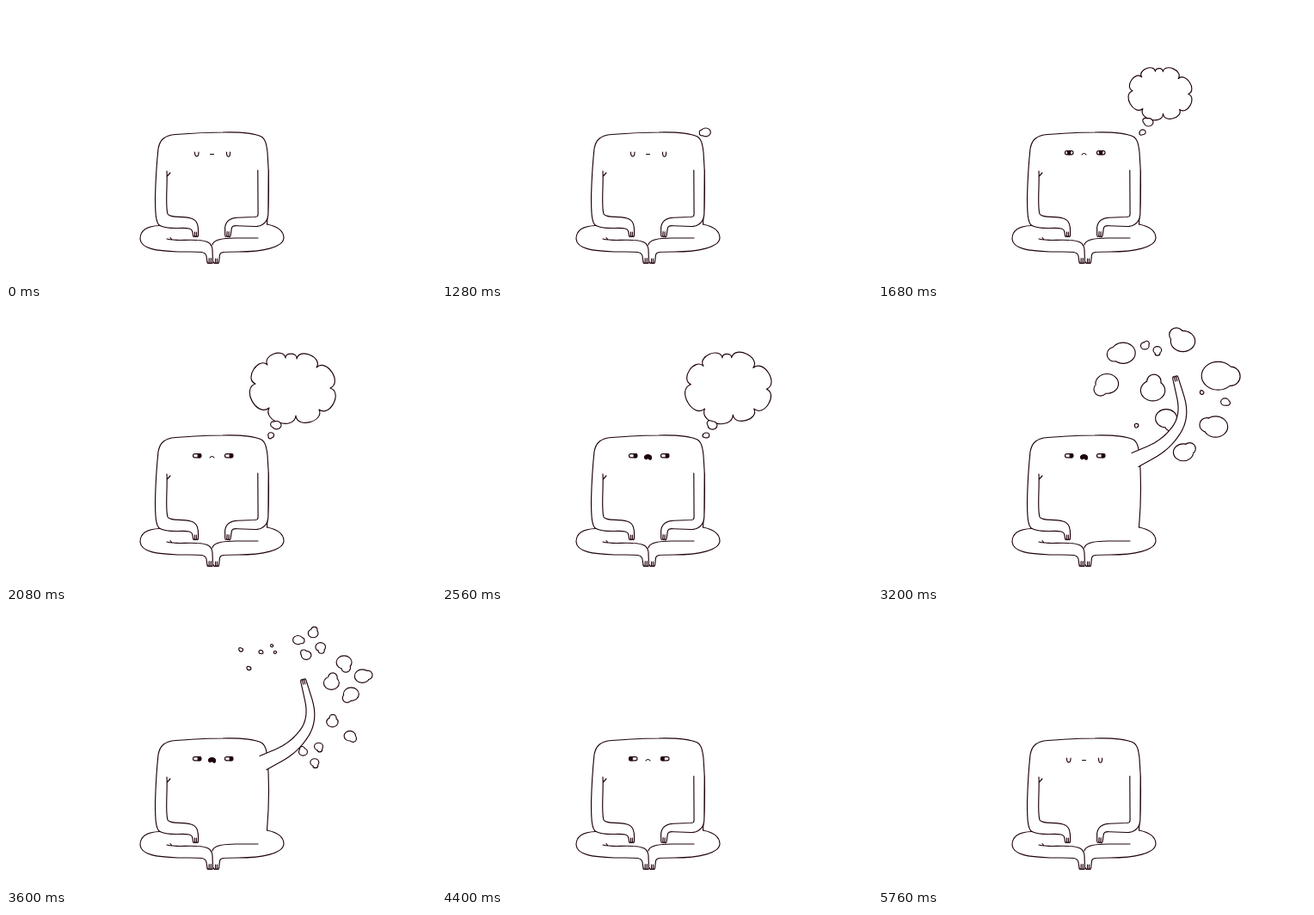
An HTML page for the animation above (6000 ms loop, 500x320 px).

```html
<!DOCTYPE html>
<html lang="en">
<head>
<meta charset="utf-8">
<title>Clearing the mind</title>
<style>
html, body { margin: 0; width: 100%; height: 100%; overflow: hidden; background: #fff; }
svg { display: block; width: 100vw; height: 100vh; }
path, rect { stroke: #1e0209; stroke-width: 1.15; fill: none; stroke-linecap: round; stroke-linejoin: round; }
.solid { fill: #1e0209; }
.paper { fill: #fff; }
#puffs { fill: #fff; stroke-width: 2.3; paint-order: stroke; }
#arm { fill: #fff; stroke: none; }
</style>
</head>
<body>
<svg viewBox="0 0 500 320">
  <path id="cloud" class="paper"/>
  <path id="puffs"/>

  <!-- body and left arm -->
  <path d="M179 255.500C174 253 173.500 240 173.500 222C174 203 175 185 177 166C179 155 185 150.500 197 149.500C217 148 235 147 252 147C272 146.500 288 148 297 152C302 155 303 162 304 170C306 195 306 225 303.500 254"/>
  <path d="M179 255.500C189 261 205 257 213 259C217 260 217 263 217.500 267"/>
  <path d="M191 194L187.500 198M187 192C188 208 185 232 188 242C191 247 204 244 215 247C223 249 224 256 223.500 267"/>

  <!-- legs -->
  <path d="M179 255.500C161 256 156 263 156 271C157 283 176 285 200 286C226 286 232 285 233 291L234 298"/>
  <path d="M191 269.500L193 272M187 271C200 274 208 271.500 222 272.500C235 273 239 276 240 283L240.500 298"/>
  <path d="M303.500 254C318 257 323 263 323 270C322 281 298 286 270 286C252 286 249 286 248.500 290L247.500 298"/>
  <path d="M240 278C241 271 254 270 267 270L293 270"/>
  <path id="digits"/>

  <path id="arm"/>
  <path id="armLine"/>

  <path id="closed" d="M219.500 170C219 176.500 224.500 176.500 224 170M256.500 170C256 177 261.500 177 260.500 170"/>
  <g id="open">
    <rect class="paper eye" x="217.500" rx="2" width="9.500"/>
    <rect class="paper eye" x="254.500" rx="2" width="9.500"/>
    <path id="pupils" class="solid"/>
  </g>
  <path id="dash" d="M237.500 172.500h4"/>
  <path id="frown" d="M237 173q2.500 -3 5 0"/>
  <path id="gape" class="solid" d="M235.500 173C235 168.500 244 168.500 243.500 173C243.500 176.500 240.500 175.500 239.500 173C238.500 175 236 175.500 235.500 173z"/>
</svg>
<script>
const STEP = 80, LOOP = 6000;
const $ = id => document.getElementById(id);
const set = (id, d) => $(id).setAttribute('d', d);
const show = (id, on) => { $(id).style.display = on ? '' : 'none'; };
const within = (t, from, to) => t >= from && t < to;
const clamp = v => Math.max(0, Math.min(1, v));
const lerp = (a, b, k) => a + (b - a) * k;
const ease = k => k * k * (3 - 2 * k);
const toward = (p, q, dist) => {
  const k = dist / Math.hypot(q[0] - p[0], q[1] - p[1]);
  return [lerp(p[0], q[0], k), lerp(p[1], q[1], k)];
};

// points where the cloud's scallops meet
const KNOTS = [[304, 65], [325, 57], [338, 58], [361, 68], [377, 92], [364, 117], [337, 124], [306, 115], [290, 87]];

// x, y, radius, pieces it breaks into
const PUFFS = [
  [284, 52, 16, 3], [311, 43, 5, 2], [325, 49, 5, 0], [353, 37, 16, 4], [397, 78, 22, 4],
  [266, 88, 15, 2], [320, 93, 16, 0], [336, 128, 14, 0], [390, 136, 16, 2], [356, 165, 13, 3],
  [301, 135, 2, 0], [376, 97, 2, 0], [403, 108, 5, 0]
];

const oval = (x, y, rx, ry) =>
  `M${x - rx} ${y}a${rx} ${ry} 0 1 1 ${2 * rx} 0a${rx} ${ry} 0 1 1 ${-2 * rx} 0z`;

// round body with one lobe
function puff(x, y, r, turn) {
  if (r < 1) return '';
  const lx = Math.cos(turn) * r * .55, ly = Math.sin(turn) * r * .55;
  return oval(x - lx * .2, y - ly * .2, r * .85, r * .72) + oval(x + lx, y + ly, r * .48, r * .48);
}

function cloud(scale, wobble) {
  const pts = KNOTS.map(([x, y], i) => [
    314 + (x + wobble * 1.4 * Math.sin(i * 2.3) - 314) * scale,
    131 + (y + wobble * 1.4 * Math.cos(i * 1.7) - 131) * scale
  ]);
  return `M${pts[0]}` + pts.map(([x, y], i) => {
    const [u, v] = pts[(i + 1) % pts.length];
    const dx = u - x, dy = v - y, nx = dy * .55, ny = -dx * .55;
    return `C${x + nx - dx * .1} ${y + ny - dy * .1} ${u + nx + dx * .1} ${v + ny + dy * .1} ${u} ${v}`;
  }).join('') + 'z';
}

function burst(t) {
  const spread = 1.08 * (1 - .45 * Math.exp((3040 - t) / 80));
  const size = 1 - .12 * Math.max(0, t - 3200) / STEP;
  return PUFFS.map(([x, y, r], i) =>
    puff(335 + (x - 335) * spread, 90 + (y - 90) * spread, r * size, i * 2.4 + 3)).join('');
}

function crumbs(t) {
  const out = lerp(.6, .85, clamp((t - 3440) / 160));
  const shrink = Math.max(0, t - 3600) / 160 * 7;
  let d = '';
  for (const [x, y, r, count] of PUFFS) {
    const heading = Math.atan2(y - 90, x - 335);
    const size = r * .45 * clamp((x - 250) / 120) - shrink;
    for (let i = 0; i < count; i++) {
      const a = heading + i * 2 * Math.PI / count;
      d += puff(x + Math.cos(a) * r * out, y + Math.sin(a) * r * out, size, a + i);
    }
  }
  return d;
}

function drawThought(t) {
  const on = within(t, 1280, 3040);
  const wobble = .5 + .5 * Math.cos(t / STEP * Math.PI / 2);
  const scale = on ? ease(clamp((t - 1360) / 480)) : 0;
  set('cloud', scale ? cloud(scale, wobble) : '');

  let d = '';
  if (on) {
    const k = clamp((t - 1280) / STEP);
    d = puff(lerp(306, 308, k) - wobble * k, 147, lerp(6, 3.3, k), 2 + wobble)
      + puff(314, 135, 5.7 * k, 3.4 + wobble * .4);
  } else if (within(t, 3040, 3440)) d = burst(t);
  else if (within(t, 3440, 3840)) d = crumbs(t);
  set('puffs', d);
}

// three finger tips between two points
function digits([ax, ay], [bx, by]) {
  const dx = (bx - ax) / 3, dy = (by - ay) / 3;
  let d = `M${ax} ${ay}`;
  for (let i = 0; i < 3; i++) {
    d += `q${dx / 2 - dy * 1.6} ${dy / 2 + dx * 1.6} ${dx} ${dy}`;
    if (i < 2) d += `l${dy * 2} ${-dx * 2}l${-dy * 2} ${dx * 2}`;
  }
  return d;
}

// centre line through shoulder, elbow, wrist and hand with rounded joints
function armSpine(lift) {
  const mix = (rest, raised) => lerp(rest, raised, lift);
  const joints = [[mix(299, 299), mix(191, 175.5)]];
  const bone = (length, angle) => {
    const [x, y] = joints[joints.length - 1], a = angle * Math.PI / 180;
    joints.push([x + Math.cos(a) * length, y + Math.sin(a) * length]);
    return length;
  };
  const bones = [
    bone(mix(60, 40), mix(90, -26)),
    bone(mix(40, 40), mix(180, -55)),
    bone(mix(16, 47), mix(94, -105))
  ];
  const spine = [joints[0]];
  for (let j = 1; j < 3; j++) {
    const p = joints[j], reach = mix(10, 24);
    const a = toward(p, joints[j - 1], Math.min(reach, bones[j - 1] / 2));
    const b = toward(p, joints[j + 1], Math.min(reach, bones[j] / 2));
    for (let k = 0; k <= 1; k += .125) {
      spine.push([0, 1].map(n => lerp(lerp(a[n], p[n], k), lerp(p[n], b[n], k), k)));
    }
  }
  return [...spine, joints[3]];
}

function drawArm(t) {
  const lift = t < 3840 ? ease(clamp((t - 2560) / 480)) : t < 3920 ? .4 : 0;
  const spine = armSpine(lift), last = spine.length - 1;
  const walked = [0];
  for (let i = 1; i <= last; i++) {
    walked.push(walked[i - 1] + Math.hypot(spine[i][0] - spine[i - 1][0], spine[i][1] - spine[i - 1][1]));
  }
  const inner = [], outer = [];
  spine.forEach(([x, y], i) => {
    const p = spine[Math.max(0, i - 1)], q = spine[Math.min(last, i + 1)];
    const a = Math.atan2(q[1] - p[1], q[0] - p[0]);
    const u = walked[i] / walked[last];
    const w = lerp(lerp(6.2, 9, lift), 3.2, u ** lerp(3, .9, lift));
    inner.push([x - Math.sin(a) * w, y + Math.cos(a) * w]);
    outer.push([x + Math.sin(a) * w, y - Math.cos(a) * w]);
  });
  set('armLine', `M${inner.join('L')}M${outer.join('L')}` + digits(inner[last], outer[last]));
  set('arm', `M${inner.join('L')}L${outer.reverse().join('L')}z`);
}

function drawFace(t) {
  const awake = within(t, 1440, 5760) && t !== 4320;
  const narrow = t === 1440 || t === 5680;
  const gape = within(t, 2480, 4400), frown = within(t, 1600, 5680) && !gape;
  const gaze = t < 1920 ? 0 : within(t, 4400, 5040) ? -1 : 1;
  const h = narrow ? 2.4 : 4.2;

  show('closed', !awake);
  show('open', awake);
  show('gape', gape);
  show('frown', frown);
  show('dash', !gape && !frown);
  for (const eye of document.querySelectorAll('.eye')) {
    eye.setAttribute('y', 172.8 - h);
    eye.setAttribute('height', h);
  }
  set('pupils', [222.2, 259.2].map(x =>
    `M${x + gaze * 2.5 - 1.5} ${173 - h}h3v${h - .4}h-3z`).join(''));
}

set('digits', digits([217.5, 267], [223.5, 267]) + digits([234, 298], [240.5, 298]) + digits([241.5, 298], [247.5, 298]));

function frame() {
  const t = Math.floor(performance.now() % LOOP / STEP) * STEP;
  drawThought(t);
  drawArm(t);
  drawFace(t);
  requestAnimationFrame(frame);
}
frame();
</script>
</body>
</html>
```
